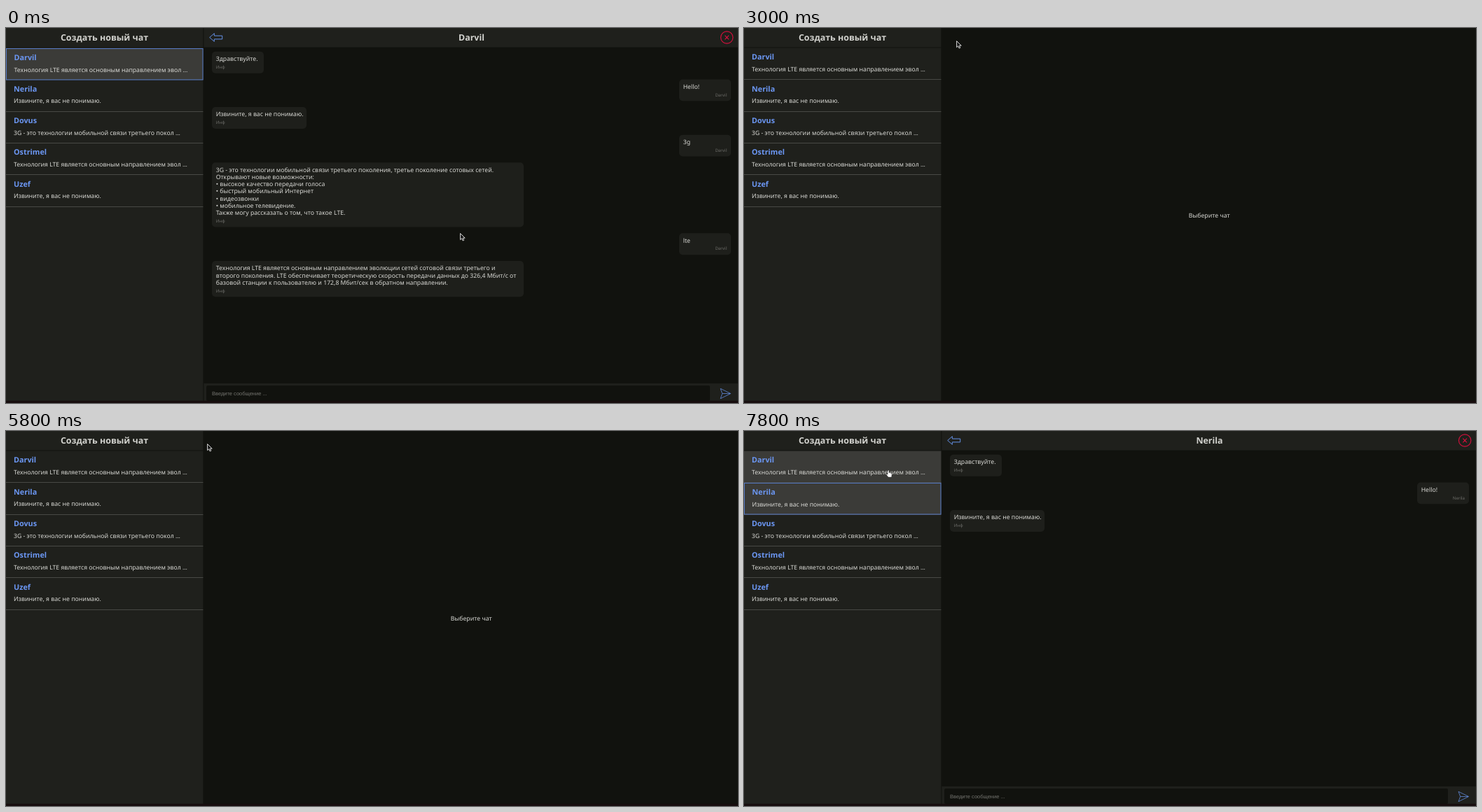
Write an HTML page that moves like this. It is 1045x536 px and loops after 8000 ms.

```html
<!DOCTYPE html>
<html lang="ru">
<head>
<meta charset="utf-8">
<title>Чат</title>
<style>
  html, body { margin: 0; width: 100%; height: 100%; overflow: hidden; background: #11120e; }
  svg { display: block; width: 1045px; height: 536px; }
  text { font: 8.68px "Noto Sans", sans-serif; fill: #d9d9d5; text-rendering: geometricPrecision; white-space: pre; }
  .title { font-size: 12.45px; font-weight: 700; text-anchor: middle; fill: #d2d2ce; }
  .name { font-size: 10.8px; font-weight: 700; fill: #6b96f2; }
  .label { font-size: 6.1px; fill: #6d6d69; }
  .hint { font: 7.5px "Liberation Sans", sans-serif; fill: #74746f; }
  .middle { text-anchor: middle; }
  .end { text-anchor: end; }
  .icon { fill: none; stroke: #6490e6; stroke-width: 1; }
  .send { stroke-width: .75; }
  .close { fill: none; stroke: #d0103c; stroke-width: 1.2; }
</style>
</head>
<body>
<svg id="stage" viewBox="0 0 1045 536"></svg>
<script>
const LOOP = 8000, STEP = 100;
const PANEL = '#1f201c', DARK = '#11120e', LIT = '#3b3b38';
const ROW_TOP = 28.6, ROW_HEIGHT = 45.3, SIDE = 281.4;

const SORRY = 'Извините, я вас не понимаю.';
const LTE_SHORT = 'Технология LTE является основным направлением эвол ...';
const contacts = [
  ['Darvil', LTE_SHORT],
  ['Nerila', SORRY],
  ['Dovus', '3G - это технологии мобильной связи третьего покол ...'],
  ['Ostrimel', LTE_SHORT],
  ['Uzef', SORRY]
];

// Each message: bubble width, lines, whether the user sent it.
const greeting = [
  [74, ['Здравствуйте.']],
  [74, ['Hello!'], true],
  [135, [SORRY]]
];
const chats = [
  [...greeting,
    [74, ['3g'], true],
    [445, [
      '3G - это технологии мобильной связи третьего поколения, третье поколение сотовых сетей.',
      'Открывают новые возможности:',
      '• высокое качество передачи голоса',
      '• быстрый мобильный Интернет',
      '• видеозвонки',
      '• мобильное телевидение.',
      'Также могу рассказать о том, что такое LTE.'
    ]],
    [74, ['lte'], true],
    [445, [
      'Технология LTE является основным направлением эволюции сетей сотовой связи третьего и',
      'второго поколения. LTE обеспечивает теоретическую скорость передачи данных до 326,4 Мбит/с от',
      'базовой станции к пользователю и 172,8 Мбит/сек в обратном направлении.'
    ]]],
  greeting
];

// Pointer keys: time, x, y, easing into the key.
const linear = u => u;
const easeOut = u => 1 - (1 - u) ** 2;
const smooth = u => u * u * (3 - 2 * u);
const path = [
  [0, 648, 293], [800, 648, 293], [1700, 375, 55, linear], [2200, 303, 18, easeOut],
  [3700, 303, 18], [4400, 246, 42, smooth],
  [5000, 246, 42], [5800, 287, 18, smooth],
  [6100, 287, 18], [6500, 215, 60, easeOut],
  [6600, 215, 60], [6700, 206, 84.5], [6800, 206, 86],
  [7300, 206, 86], [7800, 203, 55.5, smooth], [LOOP, 203, 55.5]
];

function pointerAt(t) {
  const i = path.findIndex(key => key[0] > t);
  const [t0, x0, y0] = path[i - 1];
  const [t1, x1, y1, ease = linear] = path[i];
  const u = ease((t - t0) / (t1 - t0));
  return [x0 + (x1 - x0) * u, y0 + (y1 - y0) * u];
}

function openChat(t) {
  if (t < 3000 || (t >= 5000 && t < 5800)) return 0;
  return t >= 7000 ? 1 : -1;
}

const text = (x, y, s, cls = '') => `<text x="${x}" y="${y}" class="${cls}">${s}</text>`;
const rect = (x, y, w, h, fill, extra = '') =>
  `<rect x="${x}" y="${y}" width="${w}" height="${h}" fill="${fill}" ${extra}/>`;

function sidebar(active, hovered) {
  let out = rect(0, 0, SIDE, 533, PANEL) + rect(0, 27.4, SIDE, 1.2, '#141511') +
    text(140.5, 18, 'Создать новый чат', 'title');
  contacts.forEach(([name, last], i) => {
    const y = ROW_TOP + i * ROW_HEIGHT;
    const shift = i === active ? 0.5 : 0;
    if (i === active || i === hovered) out += rect(0, y, SIDE, ROW_HEIGHT, LIT);
    out += rect(0, Math.round(y + ROW_HEIGHT - 0.5), SIDE, 1, '#484945') +
      text(11 + shift, y + 16.8 + shift, name, 'name') +
      text(11 + shift, y + 33.5 + shift, last);
  });
  if (active >= 0) {
    const top = Math.round(ROW_TOP + active * ROW_HEIGHT) + 0.5;
    out += rect(0.5, top, 280.5, 44.5, 'none', 'stroke="#5578c4"');
  }
  return out;
}

function messages(list, user) {
  let y = 33.8, out = '';
  for (const [width, lines, mine] of list) {
    const x = mine ? 961 : 294;
    const height = 20.6 + 10.23 * lines.length;
    out += rect(x, y, width, height, '#1e1f1b', 'rx="5"');
    lines.forEach((line, i) => out += text(x + 5.7, y + 13.4 + i * 10.23, line));
    out += mine ? text(x + 68, y + height - 6.7, user, 'label end')
                : text(x + 5.7, y + height - 6.7, 'Инф', 'label');
    y += height + 8.8;
  }
  return out;
}

function chatPane(index, backLit) {
  const user = contacts[index][0];
  return rect(282.4, 0, 763, 27.5, PANEL) +
    (backLit ? rect(283, 2, 34, 23, LIT, 'rx="3"') : '') +
    '<path class="icon" d="M290.7 13.5L297.3 7.7V11.1H308.7V15.9H297.3V19.3Z"/>' +
    text(664.5, 18, user, 'title') +
    '<path class="close" d="M1020.4 13.5a8.7 8.7 0 1 0 17.4 0a8.7 8.7 0 1 0-17.4 0M1026.3 10.7l5.6 5.6m0-5.6l-5.6 5.6"/>' +
    messages(chats[index], user) +
    rect(282.4, 508, 763, 25, PANEL) + rect(286, 511, 719, 22, DARK, 'rx="2"') +
    text(294, 525.3, 'Введите сообщение ...', 'hint') +
    '<path class="icon send" d="M1020 515.4L1034.5 522.5L1020 529.7L1022.6 522.5ZM1022.6 522.5H1034"/>';
}

const ARROW = '<path d="M.6.6V9.6L2.7 7.8L4.2 11L5.7 10.3L4.3 7.2H7.2Z" fill="#161616" stroke="#eee" stroke-width=".9"/>';
const HAND = '<path d="M2.1 1.2Q3.1-.4 4.1 1.2V4L7.2 4.7Q8.3 5 8.2 6.2L7.7 10.6H3L.4 7.3Q0 5.9 1.2 6L2.1 6.7Z" fill="#fff" stroke="#222" stroke-width=".5"/>';

function scene(t) {
  const [x, y] = pointerAt(t);
  const active = openChat(t);
  const row = Math.floor((y - ROW_TOP) / ROW_HEIGHT);
  const hovered = x < SIDE && row >= 0 && row < contacts.length ? row : -1;
  const backLit = x > 283 && x < 317 && y < 25;
  return rect(0, 0, 1045, 536, DARK) + sidebar(active, hovered) +
    (active >= 0 ? chatPane(active, backLit) : text(664.3, 271.2, 'Выберите чат', 'middle')) +
    rect(0, 532.8, 1045, 3.2, '#170d0e') +
    `<g transform="translate(${x} ${y})">${hovered >= 0 ? HAND : ARROW}</g>`;
}

const stage = document.getElementById('stage');
const start = performance.now();
let shown = -1;

function tick() {
  const elapsed = (performance.now() - start) % LOOP;
  const t = Math.floor(elapsed / STEP) * STEP;
  if (t !== shown) stage.innerHTML = scene(shown = t);
  requestAnimationFrame(tick);
}
tick();
</script>
</body>
</html>
```
